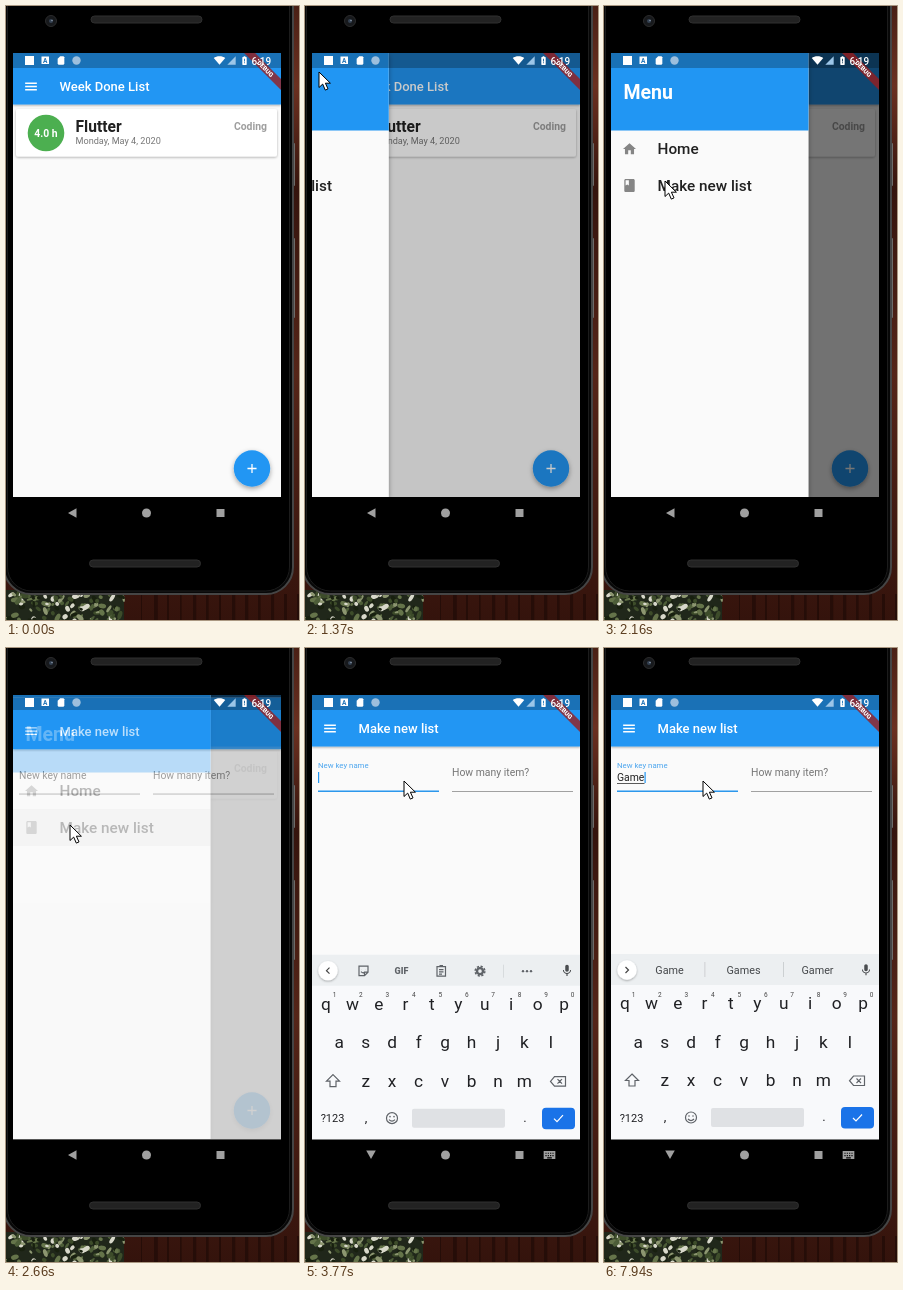
An HTML page that plays this animation: 293x614 px, repeating every 8 s.

```html
<!DOCTYPE html>
<html lang="en">
<head>
<meta charset="utf-8">
<title>Week Done List</title>
<style>
html, body { margin: 0; width: 100%; height: 100%; overflow: hidden; background: #000; }
svg { display: block; width: 293px; height: 614px; font-family: Roboto, Arial, sans-serif; }
</style>
</head>
<body>
<svg id="stage" viewBox="0 0 293 614"></svg>
<script>
const BLUE = '#2196f3', GREY = '#5f6368';
const PATHS = {
  menu: 'M3 18h18v-2H3zM3 13h18v-2H3zM3 6v2h18V6z',
  home: 'M10 20v-6h4v6h5v-8h3L12 3 2 12h3v8z',
  book: 'M18 2H6c-1.1 0-2 .9-2 2v16c0 1.1.9 2 2 2h12c1.1 0 2-.9 2-2V4c0-1.1-.9-2-2-2zM6 4h5v8l-2.5-1.5L6 12z',
  add: 'M19 13h-6v6h-2v-6H5v-2h6V5h2v6h6z',
  mic: 'M12 14c1.7 0 3-1.3 3-3V5c0-1.7-1.3-3-3-3S9 3.300 9 5v6c0 1.700 1.300 3 3 3zM17.300 11c0 3-2.500 5.100-5.300 5.100S6.700 14 6.700 11H5c0 3.400 2.700 6.200 6 6.700V21h2v-3.300c3.300-.5 6-3.300 6-6.700z',
  wifi: 'M12 21L0 7C6 2 18 2 24 7z',
  signal: 'M2 22h20V2z',
  battery: 'M16 4h-2V2h-4v2H8L7 5v16l1 1h8l1-1V5zM11 8h2v6h-2zM11 16h2v2h-2z',
  card: 'M18 2h-8L4 8v12l2 2h12l2-2V4z',
  keys: 'M2 5h20v14H2zM5 8v2h2V8zM9 8v2h2V8zM13 8v2h2V8zM17 8v2h2V8zM5 12v2h2v-2zM9 12v2h2v-2zM13 12v2h2v-2zM17 12v2h2v-2zM8 16v2h8v-2z'
};

// Markup helpers
const icon = (name, x, y, fill, size = 15.6) =>
  `<path d="${PATHS[name]}" fill="${fill}" fill-rule="evenodd" transform="translate(${x - size / 2} ${y - size / 2}) scale(${size / 24})"/>`;
const text = (str, x, y, size, fill, more = '') =>
  `<text x="${x}" y="${y}" font-size="${size}" fill="${fill}" ${more}>${str}</text>`;
const rect = (x, y, w, h, fill, more = '') =>
  `<rect x="${x}" y="${y}" width="${w}" height="${h}" fill="${fill}" ${more}/>`;
const circle = (x, y, r, fill, more = '') =>
  `<circle cx="${x}" cy="${y}" r="${r}" fill="${fill}" ${more}/>`;
const line = (d, color = GREY, more = '') =>
  `<path d="${d}" fill="none" stroke="${color}" stroke-width="1.2" ${more}/>`;
const MID = 'text-anchor="middle"', BOLD = 'font-weight="700"', MEDIUM = 'font-weight="500"';

let seed = 7;
const rand = () => (seed = seed * 16807 % 2147483647) / 2147483647;

function backdrop() {
  let s = rect(0, 0, 293, 614, 'url(#wood)');
  for (let x = 135; x < 293; x += 13) s += rect(x, 588, 1 + rand() * 3, 26, '#1c0906', 'opacity=".6"');
  s += rect(0, 584, 118, 30, '#20271a');
  const leaves = ['#3d4c2a', '#65744a', '#18200f', '#8c9670', '#d8d8ca', '#4d5d38'];
  for (let i = 0; i < 110; i++) {
    const x = rand() * 118, y = 586 + rand() * 30;
    s += `<ellipse cx="${x}" cy="${y}" rx="${1.5 + rand() * 3}" ry="${1 + rand() * 1.6}" fill="${leaves[i % 6]}" transform="rotate(${rand() * 180} ${x} ${y})"/>`;
  }
  return s;
}

function phone() {
  const slot = (x, y) => rect(x, y, 111, 7, '#222', 'rx="3.500" stroke="#303030"');
  return rect(285, 137, 4, 43, '#6d6b69', 'rx="1"') + rect(285, 232, 4, 80, '#6d6b69', 'rx="1"')
    + rect(-2, -60, 289, 648, '#080808', 'rx="27" stroke="#454545" stroke-width="2"')
    + rect(1.500, -60, 282, 645, '#000', 'rx="24" stroke="#1c1c1c"')
    + slot(85, 10) + slot(83.500, 554)
    + circle(45, 15, 5.500, '#17191c', 'stroke="#2b2b2b"') + circle(45, 15, 2, '#344252') + circle(46, 14.500, .8, '#8b98a8');
}

const appBar = title => rect(7, 47, 268, 51.500, BLUE, 'filter="url(#shadow)"')
  + icon('menu', 25, 80.500, '#fff') + text(title, 53.500, 85, 13, '#fff', MEDIUM);

const homePage = () => rect(7, 47, 268, 444, '#fafafa') + appBar('Week Done List')
  + rect(10, 103, 261, 47.500, '#fff', 'rx="2" filter="url(#shadow)"')
  + circle(40, 127, 18.300, '#4caf50') + text('4.0 h', 40, 130.700, 10.400, '#fff', MID + BOLD)
  + text('Flutter', 69.500, 126, 15.600, '#212121', BOLD)
  + text('Monday, May 4, 2020', 69.500, 138, 9.150, '#777')
  + text('Coding', 261, 124, 10.400, '#9e9e9e', BOLD + ' text-anchor="end"')
  + circle(246, 462.500, 18.200, BLUE, 'filter="url(#lift)"') + icon('add', 246, 462.500, '#fff')
  + circle(25, 80.500, 0, '#fff', 'id="ripple" opacity=".2"');

const drawer = () => rect(7, 47, 197.500, 444, '#fafafa', 'filter="url(#lift)"')
  + rect(7, 47, 197.500, 77.500, BLUE) + text('Menu', 19.500, 93, 19.500, '#fff', BOLD)
  + rect(7, 161, 197.500, 37, '#000', 'id="press" opacity="0"')
  + icon('home', 25.500, 143, '#858585') + text('Home', 53.500, 148, 15.300, '#212121', MEDIUM)
  + icon('book', 25.500, 179.500, '#858585') + text('Make new list', 53.500, 184.500, 15.300, '#212121', MEDIUM);

const formPage = () => rect(7, 47, 268, 444, '#fafafa') + appBar('Make new list')
  + text('New key name', 0, 0, 10.400, '#757575', 'id="label"')
  + text('How many item?', 147, 128, 10.400, '#757575')
  + rect(13, 143, 121, .8, '#8b8b8b') + rect(147, 143, 121, .8, '#8b8b8b')
  + rect(13, 142.500, 121, 1.400, BLUE, 'id="focus"')
  + text('', 13, 133, 10.400, '#222', 'id="typed"')
  + rect(13, 135, 0, .8, '#333', 'id="mark"') + rect(13, 124, 1.200, 11, BLUE, 'id="caret"');

function keyboard() {
  const key = (c, x, y, size = 17.300) => text(c, x, y, size, '#202124', MID);
  const row = (chars, x0, y) => [...chars].map((c, i) => key(c, x0 + i * 26.450, y)).join('');
  let s = rect(7, 306, 268, 225, '#f8f9fb') + rect(7, 306, 268, 31, '#eceff1')
    + circle(23, 322, 9.700, '#fff', 'filter="url(#shadow)"') + line('', '#444', 'id="chevron"')
    + icon('mic', 262, 322, '#4a4d50', 14);
  s += '<g id="tools">'
    + line('M54 317.500h9v6l-3.500 3.500H54zM63 323.500h-3.500v3.500M56.500 321h.1M60 321h.1M56 323q2 2 3.500 .5')
    + text('GIF', 96.500, 325.300, 9, GREY, MID + 'font-weight="900"')
    + line('M132 318h8.500v9.500H132zM134.500 317h3.500M134 321h4.500M134 323.300h4.500M134 325.500h3')
    + circle(175, 322.500, 3, 'none', `stroke="${GREY}" stroke-width="2.400"`)
    + circle(175, 322.500, 4.800, 'none', `stroke="${GREY}" stroke-width="1.600" stroke-dasharray="2.200 1.570"`)
    + rect(198, 316, .8, 13, '#d3d6d9')
    + [218, 222, 226].map(x => circle(x, 322.500, 1.200, GREY)).join('') + '</g>';
  s += '<g id="words">' + rect(100.500, 314, .8, 15, '#c5c8cb') + rect(179, 314, .8, 15, '#c5c8cb')
    + [65.500, 139.500, 213.500].map(x => text('', x, 326, 10.800, '#45484b', MID + ' class="word"')).join('') + '</g>';
  s += row('qwertyuiop', 21, 361) + row('asdfghjkl', 34.300, 399.500) + row('zxcvbnm', 60.700, 438);
  s += [...'1234567890'].map((c, i) => text(c, 29.500 + i * 26.450, 348.500, 6.500, '#444', MID)).join('');
  s += line('M28 426l6.500 6.500h-3.500v5.500h-6v-5.500h-3.500z')
    + line('M249.500 428h11v9.500h-11l-4-4.750zM252.500 430.500l4.500 4.500m0-4.500l-4.500 4.500')
    + key('?123', 27.500, 473.500, 11) + key(',', 61, 473, 13) + key('.', 220, 473, 13)
    + circle(87, 469.500, 5.500, 'none', `stroke="${GREY}" stroke-width="1.200"`)
    + circle(85, 468, .8, GREY) + circle(89, 468, .8, GREY) + line('M84 471q3 3 6 0')
    + rect(107, 460, 93, 19, '#dfe1e4', 'rx="2"')
    + rect(237, 459, 33, 21.500, '#1a73e8', 'rx="4"') + line('M249 470l3 3 6-6.500', '#fff');
  return s;
}

const statusBar = () => rect(7, 47, 268, 15, '#000', 'opacity=".25"')
  + `<g transform="translate(275 47) rotate(45)">${rect(-30, 18.300, 60, 7.800, '#9b1c1c', 'opacity=".78"')}${text('DEBUG', 0, 24.500, 6.300, '#fff', MID + 'font-weight="900"')}</g>`
  + rect(19, 50, 9, 9, '#fff')
  + rect(35.500, 50.500, 7.500, 7.500, '#fff') + text('A', 39.250, 57, 6.500, '#1970b6', MID + BOLD)
  + icon('card', 55, 54.500, '#fff', 10) + circle(70.500, 54.500, 4.200, '#9dbfdd')
  + icon('wifi', 213.500, 54.500, '#fff', 11.500) + icon('signal', 225.500, 54.500, '#9cc6e8', 10)
  + icon('battery', 238.500, 54.500, '#fff', 10.500) + text('6:19', 245.500, 58.500, 10, '#fff', MEDIUM);

const navBar = () => `<path id="back" d="M62 507l8.500-4.800v9.600z" fill="#a0a0a0"/>`
  + circle(140.500, 507, 4.500, '#a0a0a0') + rect(210.500, 503, 8, 8, '#a0a0a0')
  + `<g id="switcher">${icon('keys', 244.500, 507, '#a0a0a0', 14)}</g>`;

document.getElementById('stage').innerHTML = `
<defs>
  <linearGradient id="wood" x2="0" y2="1">
    <stop stop-color="#4a2015"/><stop offset=".13" stop-color="#6b3020"/><stop offset=".3" stop-color="#35140d"/>
    <stop offset=".6" stop-color="#552518"/><stop offset="1" stop-color="#34130c"/>
  </linearGradient>
  <filter id="shadow" x="-20%" y="-20%" width="140%" height="150%"><feDropShadow dx="0" dy="1" stdDeviation="1.200" flood-opacity=".32"/></filter>
  <filter id="lift" x="-30%" y="-30%" width="160%" height="170%"><feDropShadow dx="0" dy="2" stdDeviation="2.500" flood-opacity=".36"/></filter>
  <clipPath id="screen"><rect x="7" y="47" width="268" height="444.500"/></clipPath>
</defs>
${backdrop()}${phone()}
<g clip-path="url(#screen)">
  <g id="home">${homePage()}${rect(7, 47, 268, 444.500, '#000', 'id="scrim"')}<g id="drawer">${drawer()}</g></g>
  <g id="form">${formPage()}</g>
  <g id="keyboard">${keyboard()}</g>
  ${statusBar()}
</g>
${navBar()}
<path id="pointer" d="M0 0v15.500l3.700-3.400 2.600 6 2.700-1.200-2.600-5.700h5z" fill="#fff" stroke="#000" stroke-width="1"/>`;

const el = {};
document.querySelectorAll('svg [id]').forEach(n => el[n.id] = n);
const words = document.querySelectorAll('.word');
const set = (id, attrs) => { for (const k in attrs) el[id].setAttribute(k, attrs[k]); };
const show = (id, on) => el[id].style.display = on ? '' : 'none';

// Motion helpers
const ramp = (t, a, b) => Math.min(1, Math.max(0, (t - a) / (b - a)));
const smooth = u => u * u * (3 - 2 * u);
function bezier(x1, y1, x2, y2, x) {
  const at = (s, a, b) => 3 * (1 - s) * (1 - s) * s * a + 3 * (1 - s) * s * s * b + s * s * s;
  let lo = 0, hi = 1;
  for (let i = 0; i < 24; i++) {
    const mid = (lo + hi) / 2;
    at(mid, x1, x2) < x ? lo = mid : hi = mid;
  }
  return at(hi, y1, y2);
}

// Pointer stops: time, x, y
const ROUTE = [[170, 257, 602], [950, 21, 69], [1250, 20, 69], [1370, 14, 66], [1480, 3, 76], [1780, 45, 127],
  [2160, 61, 175], [2290, 64, 177], [2780, 64, 177], [3220, 99, 133]];
function pointerAt(t) {
  const i = ROUTE.findIndex(p => p[0] > t);
  if (i < 0) return ROUTE[ROUTE.length - 1].slice(1);
  if (!i) return ROUTE[0].slice(1);
  const a = ROUTE[i - 1], b = ROUTE[i], u = smooth(ramp(t, a[0], b[0]));
  return [a[1] + (b[1] - a[1]) * u, a[2] + (b[2] - a[2]) * u];
}

const BLINKS = [4050, 4560, 5070, 5530, 6040, 6550, 7010, 7290];
const TYPING = [7290, 7470, 7560, 7660];
const WIDTHS = [0, 7.100, 12.700, 21.800, 27.500];

function draw(t) {
  show('pointer', t >= 170);
  set('pointer', { transform: `translate(${pointerAt(t)})` });

  const tap = ramp(t, 1000, 1250);
  set('ripple', { r: 14 * tap, opacity: .2 * (1 - ramp(t, 1250, 1450)) });
  const w = Math.max(0, t - 1311) * .0224, open = 1 - (1 + w) * Math.exp(-w);
  set('drawer', { transform: `translate(${-197.500 * (1 - open)} 0)` });
  show('drawer', open > 0);
  set('scrim', { opacity: .54 * open });
  set('press', { opacity: .08 * ramp(t, 2400, 2480) });

  const page = ramp(t, 2420, 2720);
  show('home', page < 1);
  show('form', page > 0);
  set('form', {
    opacity: bezier(.42, 0, 1, 1, page),
    transform: `translate(0 ${111 * (1 - bezier(.4, 0, .2, 1, page))})`
  });

  const focus = smooth(ramp(t, 3260, 3460));
  set('label', {
    transform: `translate(13 ${128 - 8 * focus}) scale(${1 - .25 * focus})`,
    fill: focus > .4 ? '#4ba5ee' : '#757575'
  });
  set('focus', { opacity: focus });

  const rise = ramp(t, 3480, 3870);
  show('keyboard', rise > 0);
  set('keyboard', { opacity: ramp(t, 3480, 3620), transform: `translate(0 ${40 * (1 - rise) ** 3})` });
  show('switcher', t >= 3520);
  set('back', { transform: `rotate(${-90 * ramp(t, 3480, 3600)} 66 507)` });

  const count = TYPING.filter(k => k <= t).length;
  el.typed.textContent = 'Game'.slice(0, count);
  set('mark', { width: t < 7890 ? WIDTHS[Math.min(count, 3)] : WIDTHS[4] });
  set('caret', { x: 13 + WIDTHS[count] });
  show('caret', t >= 3300 && BLINKS.filter(b => b <= t).length % 2 === 0);

  const suggest = t >= 7470;
  show('tools', !suggest);
  show('words', suggest);
  set('chevron', { d: suggest ? 'M21.500 319l3 3-3 3' : 'M24.500 319l-3 3 3 3' });
  const list = t >= 7940 ? ['Game', 'Games', 'Gamer'] : t >= 7660 ? ['Gam', 'Game', 'Games'] : ['Ga', 'Game', 'Gave'];
  words.forEach((n, i) => n.textContent = list[i]);
}

const start = performance.now();
(function tick() {
  draw((performance.now() - start) % 8000);
  requestAnimationFrame(tick);
})();
</script>
</body>
</html>
```
